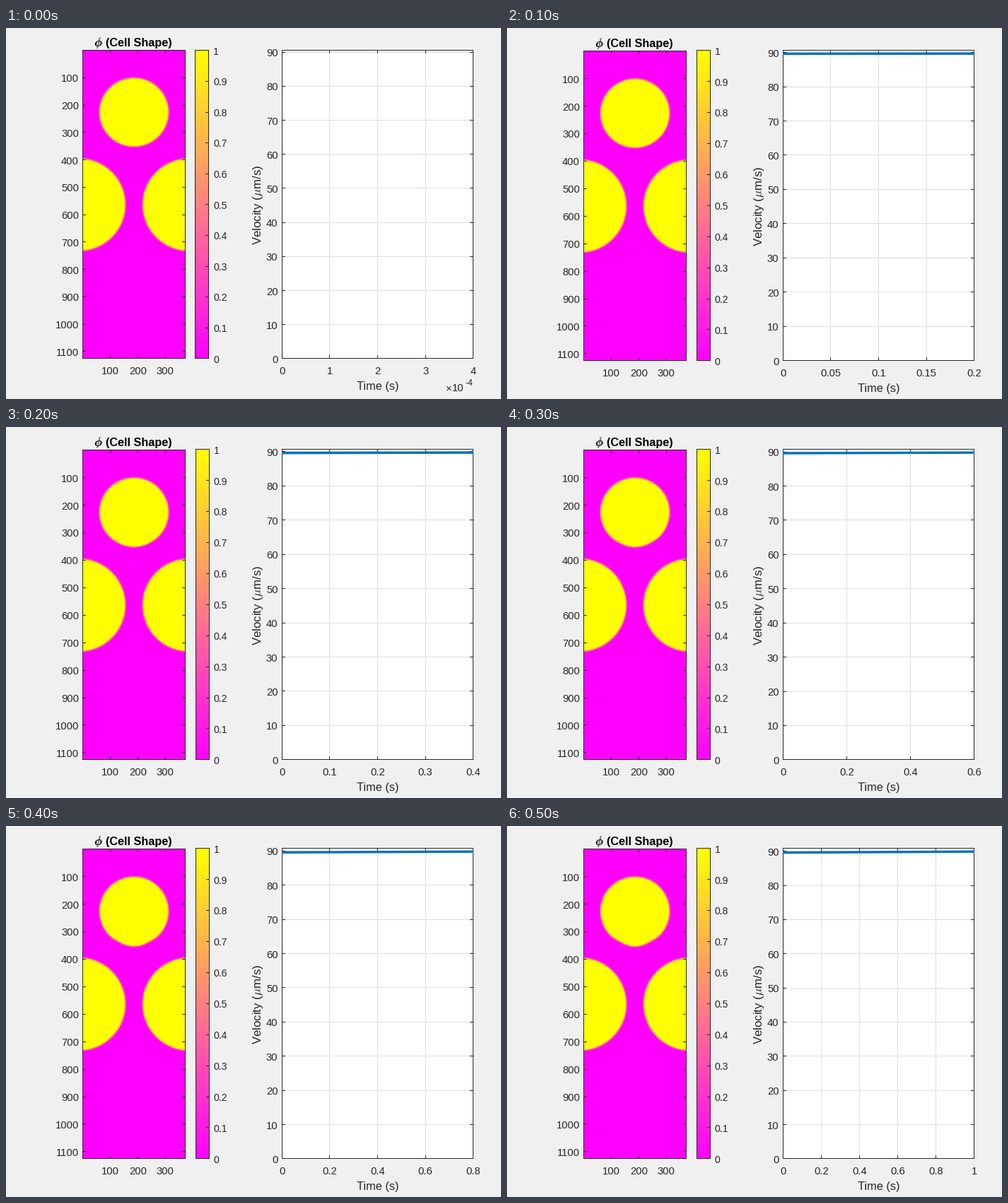
A matplotlib script for the animation above (0.6 s loop, 700x525 px).

```python
import numpy as np
import matplotlib.pyplot as plt
from matplotlib.animation import FuncAnimation
from matplotlib.patches import Rectangle

W, H, DPI = 700, 525, 100
PT = 72 / DPI
INK, GRID, BLUE = "#262626", "#dedede", "#0072bd"
TICK, LABEL, BAR = 14.8, 16.2, 14

plt.rcParams["font.family"] = "Liberation Sans"
plt.rcParams["mathtext.fontset"] = "cm"

fig = plt.figure(figsize=(W / DPI, H / DPI), dpi=DPI, facecolor="#f0f0f0")
ax = fig.add_axes([0, 0, 1, 1])

# Right-hand limit and tick labels of the time axis at each step
TIME_AXES = [
    (4e-4, ["0", "1", "2", "3", "4"]),
    (0.2, ["0", "0.05", "0.1", "0.15", "0.2"]),
    (0.4, ["0", "0.1", "0.2", "0.3", "0.4"]),
    (0.6, ["0", "0.2", "0.4", "0.6"]),
    (0.8, ["0", "0.2", "0.4", "0.6", "0.8"]),
    (1.0, ["0", "0.2", "0.4", "0.6", "0.8", "1"]),
]


def velocity(t):
    return 89.6 + 0.3 * t


def cell_field(squeeze):
    """Phase field: one upper cell and one cell wrapped around the sides."""
    x, y = np.meshgrid(np.arange(1, 376), np.arange(1, 1126))
    dx, dy = x - 188, y - 225.5
    angle = np.abs(np.arctan2(dx, dy))
    bulge = 3 * np.exp(-(angle / 0.25) ** 2)
    dent = 2 * np.exp(-((angle - 0.5) / 0.17) ** 2)
    depth = 125.5 + squeeze * (bulge - dent) - np.hypot(dx, dy)
    for cx in (-12, 388):
        depth = np.maximum(depth, 168.7 - np.hypot(x - cx, y - 563))
    return 0.5 + 0.5 * np.tanh(depth / 3)


def stroke(xs, ys, color, width=1, z=5):
    ax.plot(xs, ys, color=color, lw=width * PT, zorder=z, snap=False,
            solid_capstyle="butt")


def hline(y, x0, x1, color=INK, z=5):
    """One-pixel row y from column x0 to column x1, inclusive."""
    stroke([round(x0), round(x1) + 1], [round(y) + 0.5] * 2, color, z=z)


def vline(x, y0, y1, color=INK, z=5):
    stroke([round(x) + 0.5] * 2, [round(y0), round(y1) + 1], color, z=z)


def frame(left, top, right, bottom):
    for y in (top, bottom):
        hline(y, left, right, z=6)
    for x in (left, right):
        vline(x, top, bottom, z=6)


def tick_x(x, top, bottom, size=4):
    vline(x, top, top + size)
    vline(x, bottom - size, bottom)


def tick_y(y, left, right, size=4):
    hline(y, left, left + size)
    hline(y, right - size, right)


def label(x, y, text, size=TICK, ha="center", color=INK, **kw):
    """Text whose digits are centred vertically on y."""
    ax.text(x, y + 0.36 * size, text, fontsize=size * PT, ha=ha,
            va="baseline", color=color, **kw)


def image(data, left, top, right, bottom):
    ax.imshow(data, cmap="spring", vmin=0, vmax=1, zorder=2, aspect="auto",
              extent=(left, right, bottom, top))


def draw_cells(top, bottom, squeeze):
    left, right = 108, 253
    image(cell_field(squeeze), left, round(top) + 1, right + 1,
          round(bottom) + 1)
    frame(left, top, right, bottom)
    for v in range(100, 1101, 100):
        y = top + (v - 0.5) * (bottom - top) / 1125
        tick_y(y, left, right)
        label(103, y + 1.2, str(v), ha="right")
    for v in (100, 200, 300):
        x = left + (v - 0.5) * (right + 1 - left) / 375
        tick_x(x, top, bottom)
        label(x + 0.6, bottom + 17, str(v))
    for x in (124.2, 124.8):
        ax.text(x, top - 5, r"$\phi$", fontsize=17 * PT, color="black",
                va="baseline", ha="left")
    label(234.7, top - 10.9, "(Cell Shape)", LABEL, "right", "black",
          weight="bold")


def draw_colorbar(left, right, top, bottom):
    image(np.linspace(1, 0, 256)[:, None], left, round(top), right + 1,
          round(bottom) + 1)
    frame(left, top, right, bottom)
    for k in range(11):
        y = bottom - k * (bottom - top) / 10
        hline(y, right - 4, right)
        label(right + 7, y + 1.2, f"{k / 10:g}", BAR, "left")


def draw_velocity(step, top, bottom):
    left, right = 389.9, 660.2
    t_max, names = TIME_AXES[step]
    scale = (bottom - top) / (1.01 * velocity(t_max))
    ax.add_patch(Rectangle((390, round(top)), 271, round(bottom - top) + 1,
                           facecolor="white", lw=0, zorder=1))
    for k, name in enumerate(names):
        x = left + k * (right - left) / (len(names) - 1)
        vline(x, top, bottom, GRID, z=3)
        tick_x(x, top, bottom)
        label(x + 0.5, bottom + 17, name)
    for v in range(0, 91, 10):
        y = bottom - v * scale
        hline(y, left, right, GRID, z=3)
        tick_y(y, left, right)
        label(384.5, y + 1.2, str(v), ha="right")
    frame(left, top, right, bottom)
    if step:
        ends = [bottom + 0.5 - velocity(t) * scale for t in (0, t_max)]
        stroke([390, 661], ends, BLUE, 3.4, z=7)
    else:
        label(621.5, 509, "×", TICK, "left")
        label(647, 509, "10", TICK, "right")
        label(660.5, 502, "-4", 12.5, "right")
    label(525.5, bottom + 38.6, "Time (s)", LABEL)
    ax.text(361, (top + bottom) / 2 + 1, r"Velocity ($\mu$m/s)", color=INK,
            fontsize=16.9 * PT, rotation=90, rotation_mode="anchor",
            ha="center", va="baseline")


def draw(step):
    ax.clear()
    ax.axis("off")
    shift = 1 if step else 0
    top, bottom = 31.36, 467.36 + 3 * shift
    draw_cells(top + shift, bottom, max(step - 1, 0) / 4)
    draw_colorbar(267 + shift, 286 + shift, top, bottom)
    draw_velocity(step, top, bottom)
    ax.set_xlim(0, W)
    ax.set_ylim(H, 0)
    return []


anim = FuncAnimation(fig, draw, frames=len(TIME_AXES), interval=100,
                     init_func=lambda: [], repeat=True, blit=False)
plt.show()
```
